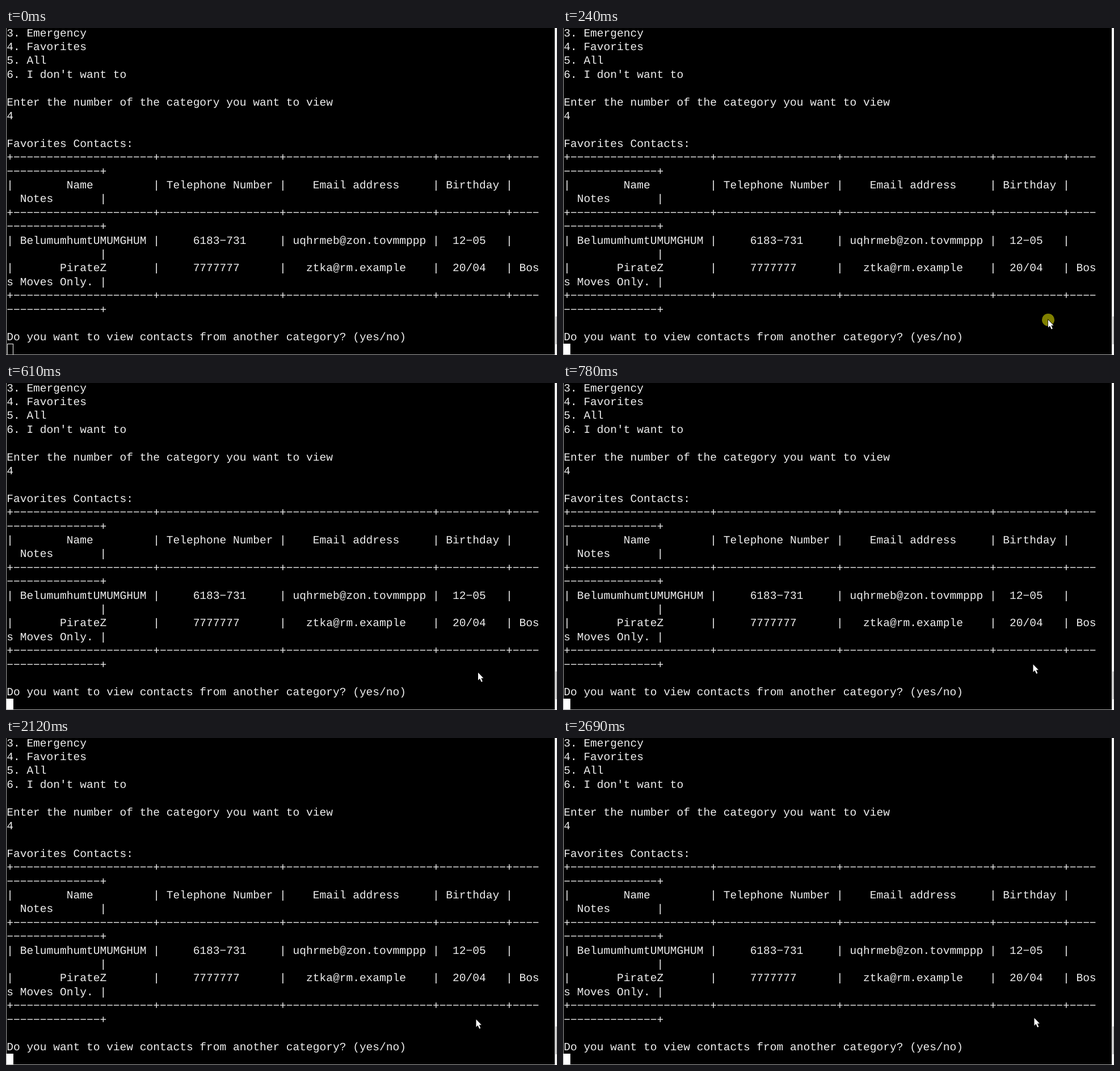
Write an HTML page that moves like this. It is 971 px wide and 577 px high and loops after 3730 ms.

```html
<!DOCTYPE html>
<html lang="en">
<head>
<meta charset="utf-8">
<title>Contact list in a terminal</title>
<style>
  html, body { margin: 0; width: 100%; height: 100%; overflow: hidden; background: #000; }
  svg { display: block; }
  text {
    font: 19.56px "Liberation Mono", "Courier New", monospace;
    fill: #eee;
    white-space: pre;
    text-rendering: geometricPrecision;
  }
</style>
</head>
<body>
<svg width="971" height="577" viewBox="0 0 971 577">
  <clipPath id="screen"><rect x="1" width="966" height="576"/></clipPath>
  <rect width="971" height="577" fill="#000"/>
  <g clip-path="url(#screen)">
    <g id="lines"></g>
    <rect id="caret"/>
  </g>
  <rect width="1" height="577" fill="#aaa"/>
  <rect y="576" width="967" height="1" fill="#aaa"/>
  <rect x="967" width="4" height="577" fill="#f0f0f0"/>
  <g id="thumb">
    <rect x="968" y="509" width="3" height="49" fill="#c1c1c1"/>
    <rect id="thumbTop" x="968" y="509" width="3" height="10" fill="#cbdcea"/>
  </g>
  <circle id="click" r="11" fill="#808000"/>
  <path id="pointer" d="M0 0V13.4L3 10.6L5.6 16.4L7.8 15.4L5.3 9.7H9.4Z"
        fill="#fff" stroke="#000" stroke-width="1.4" paint-order="stroke"/>
</svg>
<script>
const LOOP = 3730;
const COLUMNS = 80;
const CELL_WIDTHS = [21, 18, 22, 10, 18];
const LINE_HEIGHT = 24.4;
const BASELINE = 14.6;
const HIDDEN_LINES = 6;

const $ = id => document.getElementById(id);

// Terminal text
const center = (text, width) => {
  const left = Math.floor((width - text.length) / 2);
  return (" ".repeat(left) + text).padEnd(width);
};
const wrap = line => [line.slice(0, COLUMNS), line.slice(COLUMNS)];
const rule = () => wrap("+" + CELL_WIDTHS.map(w => "\u2212".repeat(w) + "+").join(""));
const row = (...cells) =>
  wrap("|" + cells.map((cell, i) => center(cell, CELL_WIDTHS[i]) + "|").join(""));

const question = "Do you want to view contacts from another category? (yes/no)";
const lines = [
  question,
  "yeap",
  "",
  "Choose a category:",
  ...["Personal", "Professional", "Emergency", "Favorites", "All", "I don't want to"]
    .map((name, i) => `${i + 1}. ${name}`),
  "",
  "Enter the number of the category you want to view",
  "4",
  "",
  "Favorites Contacts:",
  ...rule(),
  ...row("Name", "Telephone Number", "Email address", "Birthday", "Notes"),
  ...rule(),
  ...row("BelumumhumtUMUMGHUM", "6183\u2212731", "uqhrmeb@zon.tovmmppp", "12\u221205", ""),
  ...row("PirateZ", "7777777", "ztka@rm.example", "20/04", "Boss Moves Only."),
  ...rule(),
  "",
  question
];

lines.forEach((line, i) => {
  const text = document.createElementNS("http://www.w3.org/2000/svg", "text");
  text.setAttribute("x", 1.2);
  text.setAttribute("y", BASELINE + i * LINE_HEIGHT);
  text.textContent = line;
  $("lines").append(text);
});

const moves = [
  { times: [80, 110, 140, 160, 190, 210], from: [893, 562], to: [855, 515] },
  { times: [340, 380], from: [844, 515], to: [833, 514] },
  { times: [610, 650, 690, 730, 780], from: [832, 511], to: [828.5, 496.5] },
  { times: [2570, 2610, 2650, 2690], from: [829, 496], to: [830.5, 494] }
];

function pointerAt(t) {
  const move = moves.findLast(m => t >= m.times[0]);
  if (!move) return null;
  const { times, from, to } = move;
  const progress = times.findLastIndex(time => t >= time) / (times.length - 1);
  return from.map((start, i) => start + (to[i] - start) * progress);
}

function setAttributes(element, values) {
  for (const name in values) element.setAttribute(name, values[name]);
}

const show = (element, visible) =>
  element.setAttribute("visibility", visible ? "visible" : "hidden");

function render(t) {
  const scrolled = t >= 1140 && t < 2120;
  const focused = t >= 240;
  const pointer = pointerAt(t);

  const offset = scrolled ? 0 : -HIDDEN_LINES * LINE_HEIGHT;
  $("lines").setAttribute("transform", `translate(0 ${offset})`);
  $("thumb").setAttribute("transform", `translate(0 ${scrolled ? -10 : 0})`);
  show($("thumbTop"), scrolled);

  setAttributes($("caret"), focused
    ? { x: 1, y: 557, width: 12, height: 20, fill: "#fff", stroke: "none" }
    : { x: 2.5, y: 557.5, width: 10, height: 19, fill: "none", stroke: "#fff" });
  show($("caret"), !scrolled);

  show($("pointer"), pointer);
  show($("click"), t >= 240 && t < 340);
  if (pointer) {
    const place = `translate(${pointer.join(" ")})`;
    $("pointer").setAttribute("transform", place);
    $("click").setAttribute("transform", place);
  }
}

const start = performance.now();
function tick() {
  render((performance.now() - start) % LOOP);
  requestAnimationFrame(tick);
}
tick();
</script>
</body>
</html>
```
